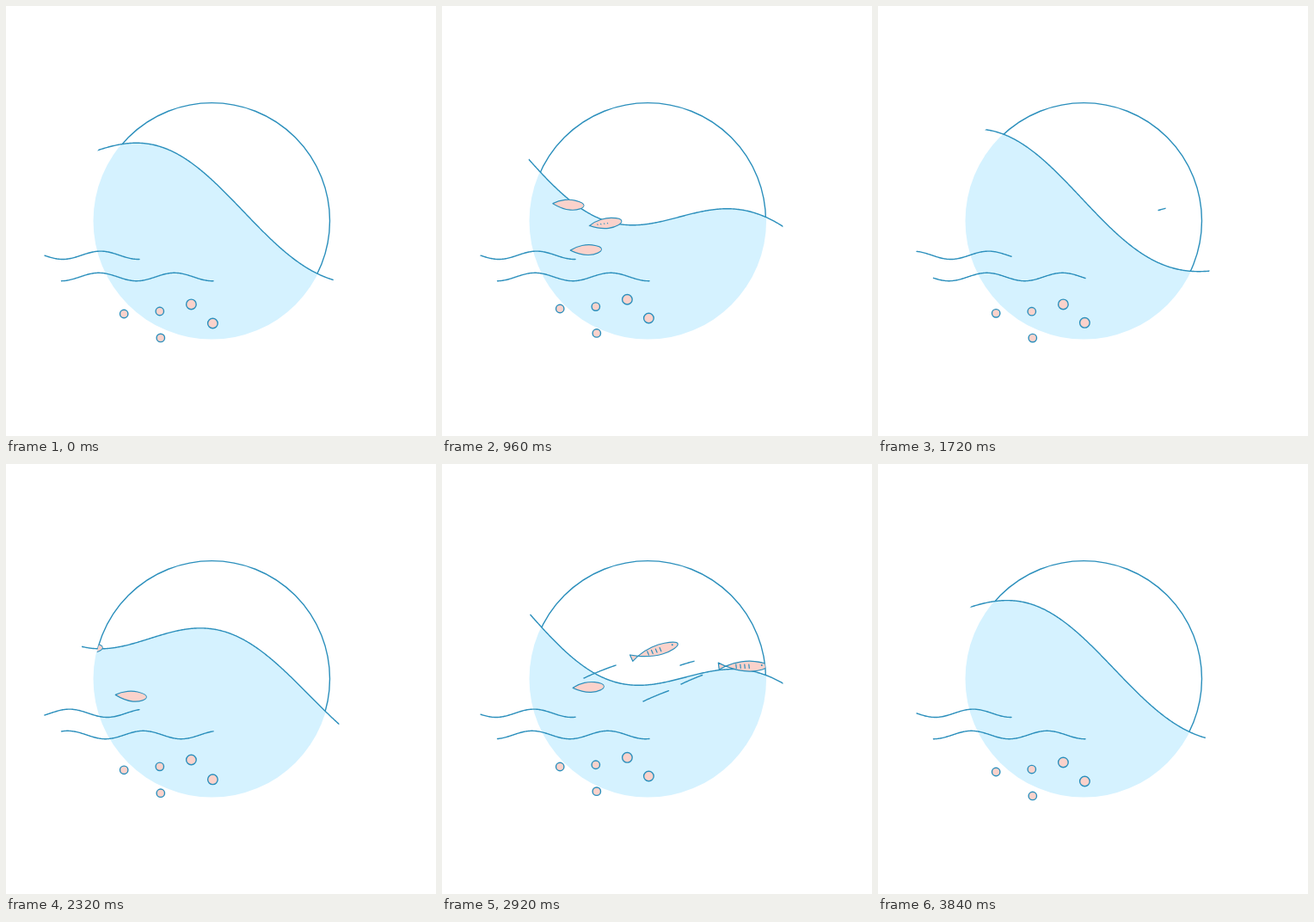
Animation of 500x500 px, one loop 3.88 s. Source, as an HTML page with a canvas:

```html
<!DOCTYPE html>
<html lang="en">
<head>
<meta charset="utf-8">
<title>Fish in the waves</title>
<style>
  html, body { margin: 0; overflow: hidden; background: #fff; }
  canvas { display: block; }
</style>
</head>
<body>
<canvas id="stage" width="500" height="500"></canvas>
<script>
const ctx = document.getElementById('stage').getContext('2d');
const LOOP = 3880, SWELL = 1924, TAU = Math.PI * 2;
const BLUE = '#2b8fbc', WATER = '#d5f2ff', PINK = '#fbd2cb';
const CX = 239.3, CY = 249.8, R = 137.2;
const K = TAU / 372;
const clamp = v => Math.max(0, Math.min(1, v));

const bubbles = [[137.2, 355], [178.8, 352.3], [179.8, 383.2], [215.4, 344.1], [240.4, 366]];
const streaks = [[237, 250], [165, 249], [234, 276], [278, 256]];

// Two shoals: fish enter at even gaps, streaks follow along an eased spread.
const shoals = [
  { enter: 545, gap: 82, lines: [237, 266, 214], trail: 1108, spread: 271, ease: 1.55 },
  { enter: 2076, gap: 250, lines: [253, 215, 242], trail: 2608, spread: 225, ease: .2 }
];

const body = new Path2D('M-20,0C-8,-5.8 6,-6.6 14,-5.7C22,-4.8 28.5,-3 28.5,-.6C28.5,2.4 20,5.7 8,5.8C-4,5.8 -12,3 -20,0Z');
const tail = new Path2D('M-20,0L-28.5,-4L-27.5,4Z');

function surface(x, t) {
  const amp = 39.7 - .028 * (x - 240);
  const crest = 188 + 372 * t / SWELL;
  return 228.1 + .39 * (x - 240) - amp * Math.cos(K * (x - crest));
}

function disc(x, y, r) {
  ctx.beginPath();
  ctx.arc(x, y, r, 0, TAU);
}

function curve(x1, x2, fn) {
  for (let x = x1; x < x2; x++) ctx.lineTo(x, fn(x));
  ctx.lineTo(x2, fn(x2));
}

function strokeCurve(x1, x2, fn) {
  ctx.beginPath();
  curve(x1, x2, fn);
  ctx.stroke();
}

function layer(draw) {
  ctx.save();
  draw();
  ctx.restore();
}

// Clips to the area between the swell and a horizontal edge of the stage.
function clipSwell(t, edge) {
  ctx.beginPath();
  curve(60, 420, x => surface(x, t));
  ctx.lineTo(420, edge);
  ctx.lineTo(60, edge);
  ctx.clip();
}

function drawSwell(t) {
  layer(() => {
    clipSwell(t, 500);
    disc(CX, CY, R + .6);
    ctx.fillStyle = WATER;
    ctx.fill();
  });
  layer(() => {
    clipSwell(t, 0);
    disc(CX, CY, R);
    ctx.stroke();
  });
  layer(() => {
    disc(240, 250, 156.7);
    ctx.clip();
    strokeCurve(60, 420, x => surface(x, t));
  });
}

function drawRipple(x1, x2, y, crest, t) {
  const start = crest - 176 * t / SWELL;
  strokeCurve(x1, x2, x => y - 4.7 * Math.cos(TAU / 88 * (x - start)));
}

function drawMarkings(size) {
  ctx.beginPath();
  for (let x = -8; x < 8; x += 5) {
    ctx.moveTo(x, -2.2 * size);
    ctx.lineTo(x + .5, 2.2 * size);
  }
  ctx.stroke();
  ctx.fillStyle = BLUE;
  disc(22, -1.2, size);
  ctx.fill();
}

// Fish speed up along a swell-shaped path and unfold tail and markings on the way.
function drawFish(age, line) {
  const x = -57 + 152 * Math.exp(.001165 * age);
  if (x < 50 || x > 420) return;
  const bend = K * (x - 163);
  const y = line + 17.8 * Math.cos(bend) - 8 * clamp((140 - x) / 40);
  const slope = -17.8 * K * Math.sin(bend) * clamp((x - 95) / 40);
  const grown = clamp((x - 185) / 40);
  layer(() => {
    ctx.translate(x, y);
    ctx.rotate(Math.atan(slope));
    ctx.scale(.75 + .25 * grown, 1);
    ctx.translate(-4.2 * (1 - grown), 0);
    ctx.lineWidth = 1.2;
    ctx.fillStyle = PINK;
    if (grown) {
      layer(() => {
        ctx.translate(-20 * (1 - grown), 0);
        ctx.scale(grown, grown);
        ctx.fill(tail);
        ctx.stroke(tail);
      });
    }
    ctx.fill(body);
    ctx.stroke(body);
    if (grown) drawMarkings(grown);
  });
}

// A line that draws itself, then vanishes from its start.
function drawStreak(x, y, age) {
  const length = 56;
  const to = length * clamp(age / 200), from = length * clamp((age - 170) / 200);
  if (to <= from) return;
  strokeCurve(x + from, x + to, px => {
    const d = px - x;
    return y - .47 * d + .0018 * d * d;
  });
}

function drawBubble(x, y, t) {
  const phase = .45 * Math.sin(Math.PI * (x - 137) / 103);
  disc(x, y + 3 * Math.cos(TAU * t / SWELL + phase), x > 200 ? 5.8 : 4.7);
  ctx.fillStyle = PINK;
  ctx.fill();
  ctx.stroke();
}

function render(t) {
  ctx.clearRect(0, 0, 500, 500);
  ctx.strokeStyle = BLUE;
  ctx.lineWidth = 1.4;
  ctx.lineCap = ctx.lineJoin = 'round';
  drawSwell(t);
  drawRipple(45, 155, 289.8, 110, t);
  drawRipple(64.5, 241, 315, 108, t);
  layer(() => {
    disc(CX, CY, R);
    ctx.clip();
    for (const { enter, gap, lines } of shoals) {
      lines.forEach((line, i) => drawFish(t - enter - i * gap, line));
    }
  });
  for (const { trail, spread, ease } of shoals) {
    streaks.forEach(([x, y], i) => drawStreak(x, y, t - trail - spread * (i / 3) ** ease));
  }
  for (const [x, y] of bubbles) drawBubble(x, y, t);
}

const begin = performance.now();
function tick() {
  render((performance.now() - begin) % LOOP);
  requestAnimationFrame(tick);
}
tick();
</script>
</body>
</html>
```
